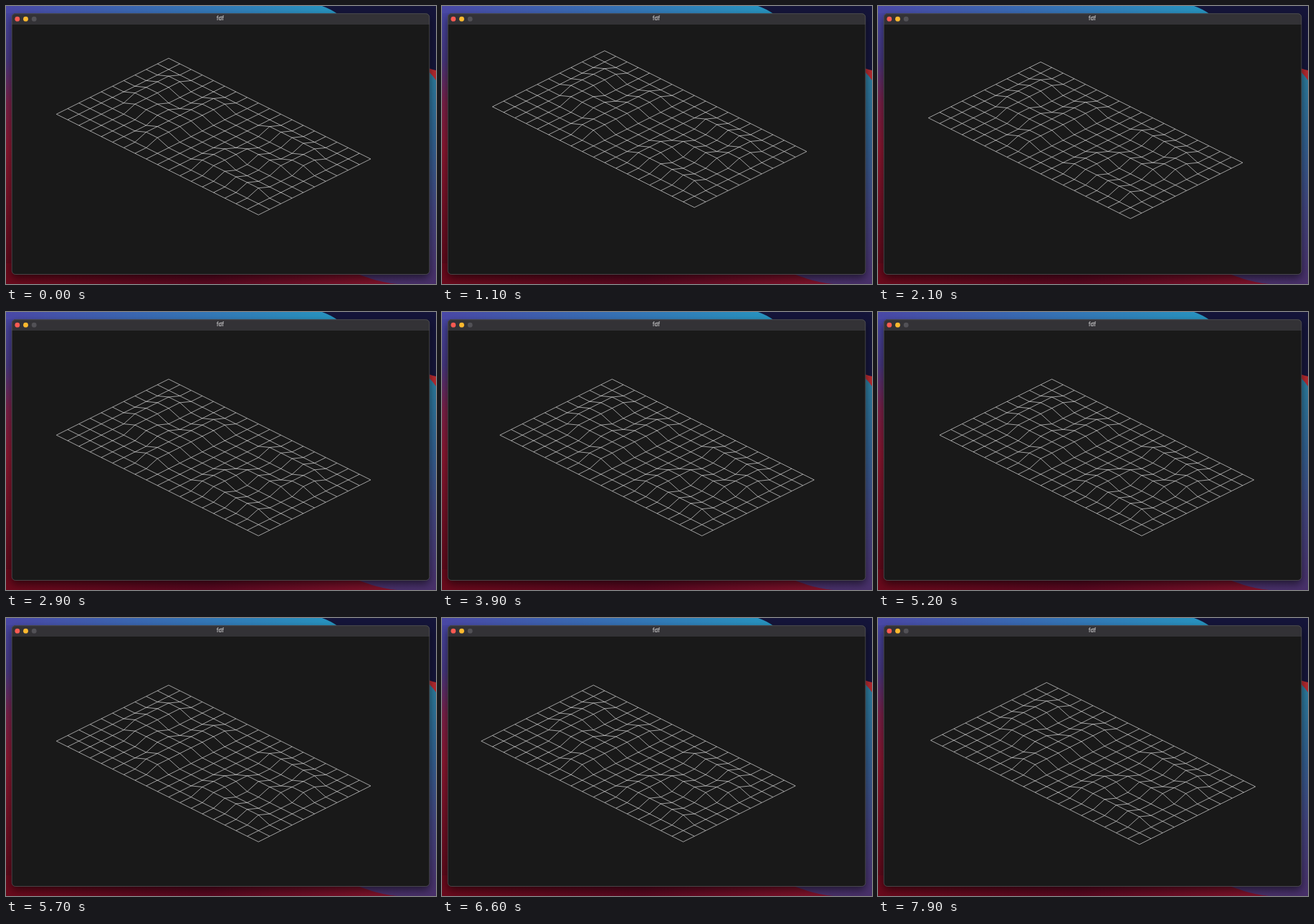
These frames come from a looping animation (600 px wide and 389 px high, 8000 ms). An HTML page:

```html
<!DOCTYPE html>
<html lang="en">
<head>
<meta charset="utf-8">
<title>fdf</title>
<style>
  html, body { margin: 0; width: 100%; height: 100%; overflow: hidden; background: #14142c; }
  svg { display: block; width: 600px; height: 389px; }
  .window { filter: drop-shadow(0 5px 6px rgba(0, 0, 0, .55)); }
  .title { font: 600 7.6px Inter, "Liberation Sans", sans-serif; fill: #bdbcbe; text-anchor: middle; }
  #mesh { fill: none; stroke: #fff; stroke-opacity: .78; stroke-width: .75; }
</style>
</head>
<body>
<svg viewBox="0 0 600 389">
  <defs>
    <linearGradient id="sky">
      <stop offset="0" stop-color="#4a48a6"/>
      <stop offset=".4" stop-color="#3a68b2"/>
      <stop offset="1" stop-color="#2795c0"/>
    </linearGradient>
    <linearGradient id="left" x2="0" y2="1">
      <stop offset="0" stop-color="#4645a0"/>
      <stop offset=".17" stop-color="#46377f"/>
      <stop offset=".33" stop-color="#7a2048"/>
      <stop offset=".5" stop-color="#8a1730"/>
      <stop offset="1" stop-color="#560817"/>
    </linearGradient>
    <linearGradient id="right" x2="0" y2="1">
      <stop offset="0" stop-color="#2c7f9f"/>
      <stop offset=".35" stop-color="#31608f"/>
      <stop offset=".65" stop-color="#42457f"/>
      <stop offset="1" stop-color="#49306a"/>
    </linearGradient>
    <linearGradient id="floor">
      <stop offset="0" stop-color="#6a0a1c"/>
      <stop offset=".5" stop-color="#580820"/>
      <stop offset="1" stop-color="#84142c"/>
    </linearGradient>
  </defs>

  <rect width="600" height="389" fill="#15153a"/>
  <path d="M0 0H441Q453 4 464 12H0Z" fill="url(#sky)"/>
  <rect y="10" width="30" height="379" fill="url(#left)"/>
  <rect y="360" width="560" height="29" fill="url(#floor)"/>
  <path d="M580 84Q592 88 600 90V112H580Z" fill="#b52a30"/>
  <path d="M580 84Q592 92 600 104V389H546Q515 386 484 372H580Z" fill="url(#right)"/>

  <g class="window">
    <rect x="8" y="10.5" width="583" height="365" rx="5" fill="#191919"/>
  </g>
  <path d="M8 26V15.5a5 5 0 0 1 5-5H586a5 5 0 0 1 5 5V26Z" fill="#333236"/>
  <rect x="8.2" y="10.7" width="582.6" height="364.8" rx="5" fill="none" stroke="#59595c" stroke-width=".7"/>
  <circle cx="15.8" cy="18.2" r="3.4" fill="#fb5a52"/>
  <circle cx="27.5" cy="18.2" r="3.4" fill="#fcb92e"/>
  <circle cx="39.2" cy="18.2" r="3.4" fill="#525156"/>
  <text class="title" x="299" y="20.4">fdf</text>
  <path id="mesh"/>
</svg>
<script>
const LOOP = 8000;
const PX = 0.522;        // window pixels to stage pixels
const NUDGE = 10 * PX;   // distance moved by one key press
const CENTER = { x: 289.6, y: 182.7, col: 9, row: 5 };
const RELIEF = 0.4;

const map = [
  '0000000000000000000',
  '0000000000000000000',
  '0011001100011111000',
  '0011001100000001100',
  '0011001100000001100',
  '0011111100001111000',
  '0001111100011000000',
  '0000001100011000000',
  '0000001100011111100',
  '0000000000000000000',
  '0000000000000000000'
];

// Key presses: direction and the times (ms) at which each takes effect.
const keys = [
  { axis: 'y', by: -1, at: [1000, 1100, 1300] },
  { axis: 'y', by: 1, at: [1500, 1700, 1900, 2100, 2300, 2500, 2700] },
  { axis: 'x', by: 1, at: [3600, 3900, 4200, 4200, 4400, 4600] },
  { axis: 'x', by: -1, at: [4800, 5000, 5200, 5400, 5500, 5700, 5800, 5900, 6000, 6100] },
  { axis: 'x', by: 1, at: [6600, 6800, 6900, 7000, 7100, 7200] },
  { axis: 'zoom', by: 1, at: [7900] }
];

function viewAt(time) {
  const view = { x: 0, y: 0, zoom: 30 };
  for (const { axis, by, at } of keys) {
    view[axis] += by * at.filter(t => t <= time).length;
  }
  return view;
}

function meshPath({ x, y, zoom }) {
  const step = zoom * PX;
  const project = (col, row) => {
    const u = col - CENTER.col, v = row - CENTER.row;
    const px = CENTER.x + x * NUDGE + (u - v) * step;
    const py = CENTER.y + y * NUDGE + ((u + v) / 2 - map[row][col] * RELIEF) * step;
    return px.toFixed(2) + ' ' + py.toFixed(2);
  };
  const line = points => 'M' + points.join('L');
  const rows = map.map((cells, row) => line([...cells].map((_, col) => project(col, row))));
  const cols = [...map[0]].map((_, col) => line(map.map((_, row) => project(col, row))));
  return rows.concat(cols).join('');
}

const mesh = document.getElementById('mesh');
const start = performance.now();

function draw() {
  const time = (performance.now() - start) % LOOP;
  mesh.setAttribute('d', meshPath(viewAt(time)));
  requestAnimationFrame(draw);
}
draw();
</script>
</body>
</html>
```
